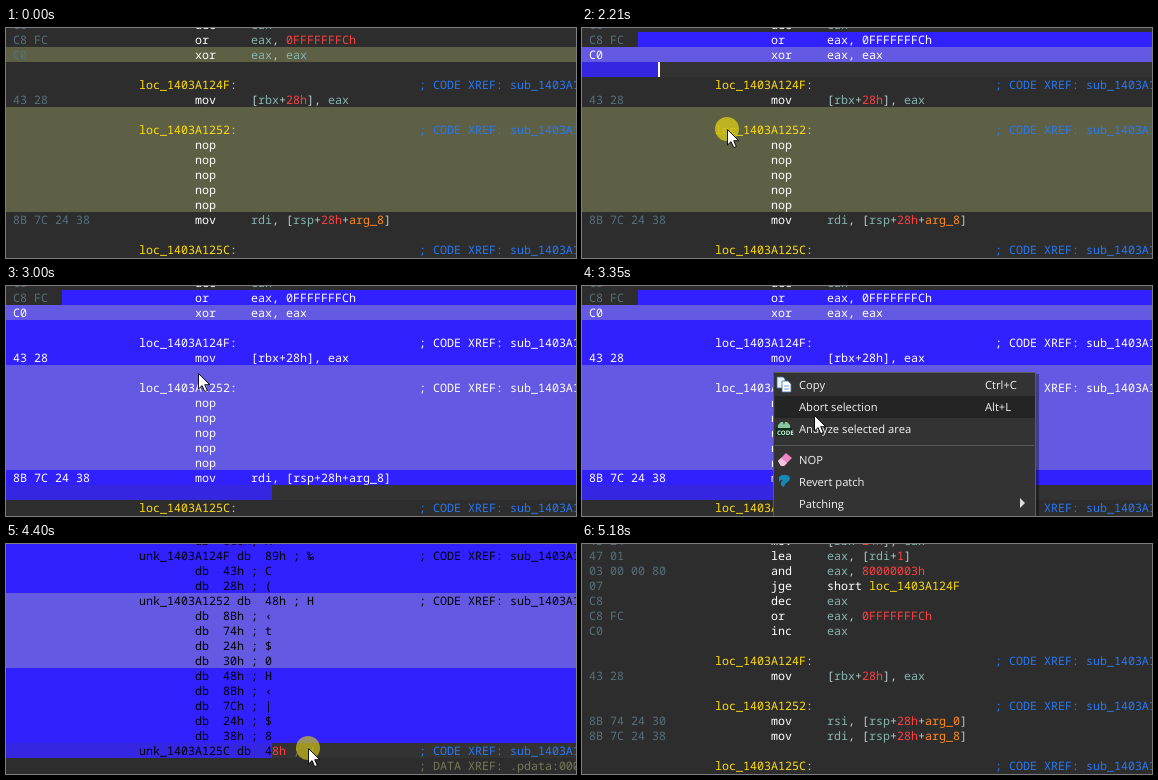
An HTML page for the animation above (6990 ms loop, 570 by 230 pixels).

```html
<!DOCTYPE html>
<html lang="en">
<head>
<meta charset="utf-8">
<title>Reverting a patch</title>
<style>
  html, body { margin: 0; width: 100%; height: 100%; overflow: hidden; background: #2d2d2d; }
  svg { display: block; width: 570px; height: 230px; }
  text { white-space: pre; text-rendering: geometricPrecision; }
  .code { font: 11.667px "Noto Sans Mono", "DejaVu Sans Mono", monospace; fill: #b3cfcd; }
  .hex { fill: #56707c; }
  .op { fill: #fff; }
  .reg { fill: #86b5b0; }
  .num { fill: #ff4040; }
  .name { fill: #ffdd0f; }
  .arg { fill: #ff8c1a; }
  .ref { fill: #2a78f2; }
  .dim { fill: #77775c; }
  .white, .white * { fill: #fff; }
  .black, .black * { fill: #000; }
  .menu { font: 11.2px "Open Sans", "Noto Sans", sans-serif; fill: #f2f2f2; }
</style>
</head>
<body>
<svg id="stage" viewBox="0 0 570 230">
  <defs><clipPath id="selClip"><path id="selShape"/></clipPath></defs>
  <rect width="570" height="230" fill="#2d2d2d"/>
  <rect id="lineMark" width="570" height="15" fill="#333"/>
  <g id="plain"></g>
  <g clip-path="url(#selClip)">
    <rect width="570" height="230" fill="#3120ff"/>
    <g id="selMarks"></g>
    <rect id="selLine" width="570" height="15" fill="#3526e2"/>
    <g id="selText"></g>
  </g>
  <rect id="caret" width="2" height="15" fill="#fff"/>
  <g id="menu" class="menu">
    <rect x="193" y="88" width="264" height="150" fill="#000" opacity=".35"/>
    <rect x="191.5" y="86.5" width="262" height="160" fill="#333" stroke="#5c5c5c"/>
    <rect id="hover" x="193" width="260" height="22" fill="#242424"/>
    <path d="M193 159.5H452" stroke="#575757"/>
    <g id="items"></g>
    <path d="M438 212v10l5-5z" fill="#ddd"/>
    <g id="copyIcon" stroke="#3f6f9c" stroke-width=".8">
      <path d="M195 91h6l2 2v9h-8z" fill="#e8f1fa"/>
      <path d="M200 95h6l3 3v8h-9z" fill="#fff"/>
      <path d="M202 100h5M202 103h5" stroke="#4c87c4"/>
    </g>
    <g id="codeIcon">
      <path d="M196 143v-4l3-3h2l1 3 1-3h2l3 3v4z" fill="#85c7a0"/>
      <rect x="194" y="142" width="16" height="8" fill="#0d2b1c"/>
      <text x="195" y="149" font-size="6.2" font-weight="700" fill="#d9ffe6">CODE</text>
    </g>
    <g id="eraserIcon">
      <path d="M196 175l8-8 6 5-8 8h-3z" fill="#ec86c4"/>
      <path d="M196 175l3-3 6 5-3 3h-3z" fill="#f6c4e2"/>
    </g>
    <path id="revertIcon" d="M197 191c3-3 10-3 11 1 0 4-5 4-6 9-4-1-4-5-1-7-2 0-3 0-4 2z" fill="#1688b8"/>
  </g>
  <circle id="click" r="12" fill="#d2c518"/>
  <path id="pointer" d="M.5 .5V16l3.6-3.4 2.6 6 2.6-1.1-2.6-5.8h5z" fill="#fff" stroke="#000" stroke-width=".9"/>
</svg>
<script>
const LOOP = 6990, CH = 7, LINE = 15, TOP = -11, LAST = [14, 38];
const $ = id => document.getElementById(id);
const rowY = r => TOP + r * LINE;
const show = (el, on) => el.setAttribute('display', on ? 'inline' : 'none');
const place = (el, x, y) => el.setAttribute('transform', `translate(${x} ${y})`);

// Rows are lists of [column, text, class].
const XREF = [59, '; CODE XREF: sub_1403A1', 'ref'];
const code = (hex, op, args) => [[1, hex, 'hex'], [27, op, 'op'], [35, args, 'args']];
const label = addr => [[19, 'loc_' + addr, 'name'], [32, ':', ''], XREF];
const nop = [[27, 'nop', 'op']];
const byte = (hex, char, addr) => addr
  ? [[19, 'unk_' + addr, 'name'], [33, 'db', 'op'], [37, hex, 'num'], [41, '; ' + char, 'dim'], XREF]
  : [[27, 'db', 'op'], [31, hex, 'num'], [35, '; ' + char, 'dim']];

const A = '1403A124F', B = '1403A1252', C = '1403A125C';
const store = code('43 28', 'mov', '[rbx+28h], eax');
const align = code('C8 FC', 'or', 'eax, 0FFFFFFFCh');
const load = code('8B 7C 24 38', 'mov', 'rdi, [rsp+28h+arg_8]');

const views = {
  patched: {
    start: [1, 8], marks: [2, 6, 7, 8, 9, 10, 11, 12], markFill: '#5d6044', ink: 'white',
    rows: [code('C8', 'dec', 'eax'), align, code('C0', 'xor', 'eax, eax'), [], label(A), store, [],
      label(B), nop, nop, nop, nop, nop, load, [], label(C)]
  },
  raw: {
    start: [0, 0], marks: [4, 5, 6, 7, 8], markFill: '#5d6044', ink: 'black',
    rows: [byte('0C0h', 'À'), byte('89h', '‰', A), byte('43h', 'C'), byte('28h', '('),
      byte('48h', 'H', B), byte('8Bh', '‹'), byte('74h', 't'), byte('24h', '$'), byte('30h', '0'),
      byte('48h', 'H'), byte('8Bh', '‹'), byte('7Ch', '|'), byte('24h', '$'), byte('38h', '8'),
      byte('48h', 'H', C), [[59, '; DATA XREF: .pdata:000', 'dim']]]
  },
  restored: {
    start: [5, 8], marks: [], ink: 'white',
    rows: [code('43 24', 'mov', '[rbx+24h], eax'), code('47 01', 'lea', 'eax, [rdi+1]'),
      code('03 00 00 80', 'and', 'eax, 80000003h'), code('07', 'jge', 'short loc_' + A),
      code('C8', 'dec', 'eax'), align, code('C0', 'inc', 'eax'), [], label(A), store, [],
      label(B), code('8B 74 24 30', 'mov', 'rsi, [rsp+28h+arg_0]'), load, [], label(C)]
  }
};

const kinds = [[/^e?r?(ax|bx|di|si|sp)$/, 'reg'], [/^arg_/, 'arg'], [/^loc_/, 'name'],
  [/^short$/, 'op'], [/^[0-9]/, 'num']];
const tint = args => args.replace(/\w+/g, word => {
  const kind = kinds.find(([re]) => re.test(word));
  return kind ? `<tspan class="${kind[1]}">${word}</tspan>` : word;
});
const drawRow = (row, r) => row.map(([col, str, cls]) =>
  `<text class="${cls}" x="${col * CH}" y="${rowY(r) + 12}">${cls === 'args' ? tint(str) : str}</text>`).join('');
const drawMarks = (marks, fill) => marks.map(r =>
  `<rect y="${rowY(r)}" width="570" height="${LINE}" fill="${fill}"/>`).join('');

for (const v of Object.values(views)) {
  const text = v.rows.map(drawRow).join('');
  v.layers = [['plain', drawMarks(v.marks, v.markFill) + `<g class="code">${text}</g>`],
    ['selMarks', drawMarks(v.marks, '#6459e2')],
    ['selText', `<g class="code ${v.ink}">${text}</g>`]].map(([parent, html]) => {
    const g = document.createElementNS('http://www.w3.org/2000/svg', 'g');
    g.innerHTML = html;
    return $(parent).appendChild(g);
  });
}

const items = [['Copy', 88, 'Ctrl+C'], ['Abort selection', 110, 'Alt+L'], ['Analyze selected area', 132],
  ['NOP', 163], ['Revert patch', 185], ['Patching', 207]];
$('items').innerHTML = items.map(([name, y, keys = '']) =>
  `<text x="217" y="${y + 15}">${name}</text><text x="403" y="${y + 15}">${keys}</text>`).join('');

// Pointer moves, each held in equal steps.
const smooth = p => p * p * (3 - 2 * p);
const slow = p => 1 - (1 - p) ** 3.8;
const move = (at, end, steps, from, to, ease = p => p) => ({ at, end, steps, from, to, ease });
const drag = move(2120, 2800, 10, [77, 44], [266, 203], slow);
const moves = [
  move(1380, 2060, 10, [112, 90], [53, 11], smooth), drag,
  move(2880, 3000, 3, [250, 178], [192, 87], smooth),
  move(3080, 3080, 1, [191, 86], [191, 86]),
  move(3210, 3540, 6, [200, 96], [290, 190], smooth),
  move(3600, 3680, 2, [297, 198], [302, 204]),
  move(4860, 4860, 1, [308, 211], [308, 211])
];
const stepOf = (m, t) => m.steps < 2 ? 0
  : Math.min(m.steps - 1, Math.floor((t - m.at) / (m.end - m.at) * (m.steps - 1) + 1e-6));
const pointAt = (m, k) => {
  const p = m.steps < 2 ? 1 : m.ease(k / (m.steps - 1));
  return m.from.map((a, i) => a + (m.to[i] - a) * p);
};
const within = (t, a, b) => t >= a && t < b;

// The selection trails the dragging pointer by one step.
function selectionEnd(t, start) {
  if (t >= drag.end) return LAST;
  const k = stepOf(drag, t);
  if (!k) return start;
  const [x, y] = pointAt(drag, k - 1);
  return [Math.floor((y - TOP) / LINE), Math.round(x / CH)];
}

function render(t) {
  const view = t < 4400 ? views.patched : t < 4480 || t >= LOOP ? views.raw : views.restored;
  for (const v of Object.values(views)) v.layers.forEach(g => show(g, v === view));

  const selecting = within(t, 2120, 5180);
  const [r0, c0] = view.start, [r1, c1] = selectionEnd(t, view.start);
  const x0 = c0 * CH, x1 = c1 * CH, y0 = rowY(r0), y1 = rowY(r1);
  $('selShape').setAttribute('d', selecting
    ? `M${x0} ${y0}H570V${y1}H${x1}V${y1 + LINE}H0V${y0 + LINE}H${x0}Z` : 'M0 0');
  place($('lineMark'), 0, y1);
  place($('selLine'), 0, y1);
  place($('caret'), x1 - 1, y1);
  show($('lineMark'), selecting);
  show($('caret'), within(t, 2120, 2880) || within(t, 4540, 4860));

  const m = moves.filter(v => v.at <= t).pop();
  const [x, y] = m ? pointAt(m, stepOf(m, t)).map(Math.round) : [0, 0];
  place($('pointer'), x, y);
  place($('click'), x, y);
  show($('pointer'), within(t, 1380, 4920));
  show($('click'), within(t, 1980, 2720) || within(t, 3080, 3210) || within(t, 3990, 4540));
  $('click').setAttribute('opacity', t >= 4400 ? .68 : .82);

  show($('menu'), within(t, 3150, 4330));
  const over = items.find(i => y >= i[1] && y < i[1] + 22);
  show($('hover'), over);
  if (over) $('hover').setAttribute('y', over[1]);
}

const began = performance.now();
(function tick() {
  render((performance.now() - began) % LOOP);
  requestAnimationFrame(tick);
})();
</script>
</body>
</html>
```
